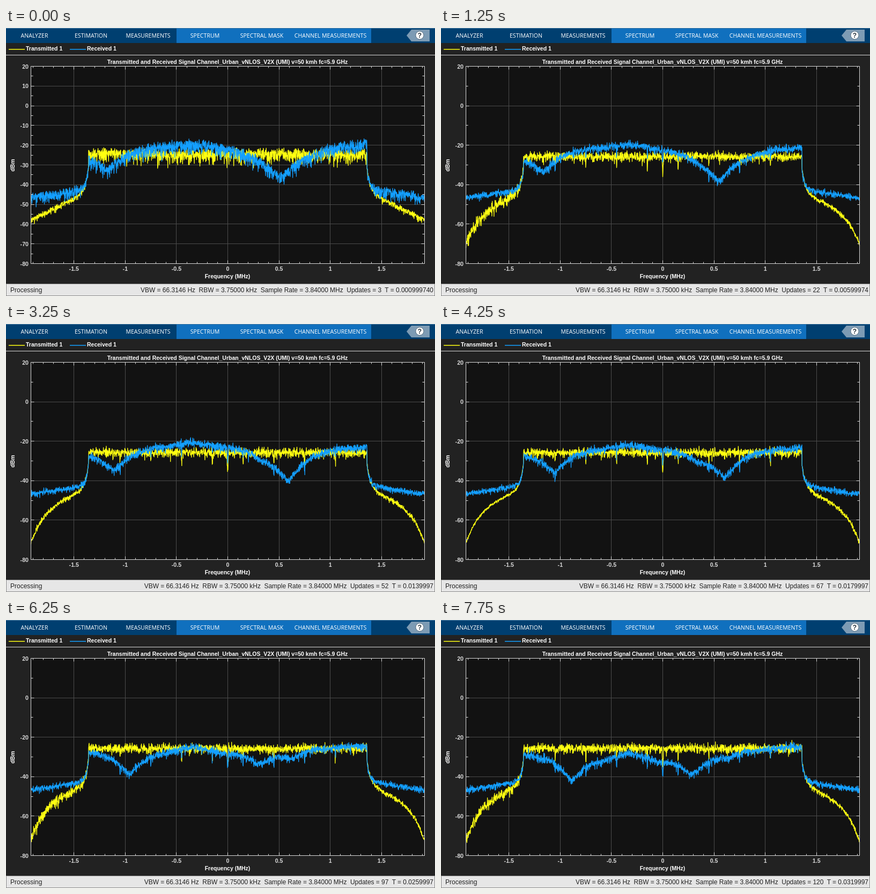
Write an HTML page that moves like this. It is 800 px wide and 500 px high and loops after 8000 ms.

```html
<!DOCTYPE html>
<html lang="en">
<head>
<meta charset="utf-8">
<title>Spectrum analyzer</title>
<style>
html, body { margin: 0; width: 100%; height: 100%; overflow: hidden; background: #222; }
svg { display: block; width: 800px; height: 500px; }
text { white-space: pre; }
.tab { font: 10.6px "Open Sans", "Noto Sans", sans-serif; fill: #fff; text-anchor: middle; }
.bold { font: bold 10.5px "Liberation Sans", Arial, sans-serif; fill: #fff; }
.tick { font-size: 10.67px; fill: #d9d9d9; }
.help { font-size: 12px; fill: #26323c; }
.status { font: 12px "Liberation Sans", Arial, sans-serif; fill: #222; word-spacing: -0.1px; }
.mid { text-anchor: middle; }
.end { text-anchor: end; }
.grid { stroke: #4b4b4b; fill: none; }
.axis { stroke: #d9d9d9; fill: none; }
.trace { fill: none; stroke-width: 1.3; stroke-linejoin: round; }
</style>
</head>
<body>
<svg id="stage" viewBox="0 0 800 500"></svg>
<script>
const STEP = 250, STEPS = 32, BINS = 2048;
const BOX = { x: 46.5, y: 71.5, w: 734, h: 368 };
const MID = BOX.x + BOX.w / 2;
const TX = '#ffff11', RX = '#139fff';
const stage = document.getElementById('stage');

function add(tag, attrs, text) {
  const el = document.createElementNS('http://www.w3.org/2000/svg', tag);
  for (const key in attrs) el.setAttribute(key, attrs[key]);
  if (text) el.textContent = text;
  stage.append(el);
  return el;
}
const rect = (x, y, width, height, fill) => add('rect', { x, y, width, height, fill });
const label = (x, y, cls, text) => add('text', { x, y, class: cls }, text);
const path = (cls, stroke) => add('path', stroke ? { class: cls, stroke } : { class: cls });
const xOf = mhz => MID + mhz / 1.92 * BOX.w / 2;
const yOf = dbm => BOX.y + (20 - dbm) / 100 * BOX.h;

// Toolstrip
rect(0, 0, 800, 500, '#222222');
rect(0, 0, 800, 28, '#003f70');
rect(318, 0, 363, 28, '#1070be');
rect(0, 0, 800, 1, '#4d7ea3');
[['ANALYZER', 53], ['ESTIMATION', 158.5], ['MEASUREMENTS', 265], ['SPECTRUM', 371],
 ['SPECTRAL MASK', 477], ['CHANNEL MEASUREMENTS', 605]].forEach(([t, x]) => label(x, 18, 'tab', t));
add('path', { d: 'M747 14L756 3H790V25H756Z', fill: '#7d9bb4' });
add('circle', { cx: 771.5, cy: 13.5, r: 7.5, fill: '#fff', stroke: '#5a6f80' });
label(771.5, 18, 'bold help mid', '?');

// Legend
rect(0, 50, 800, 1, '#d9d9d9');
rect(5, 39, 30, 1.5, TX);
rect(119, 39, 30, 1.5, RX);
label(37, 42, 'bold', 'Transmitted 1');
label(151, 42, 'bold', 'Received 1');

// Axes
rect(BOX.x, BOX.y, BOX.w, BOX.h, '#121212');
const grid = path('grid');
const tx = path('trace', TX), rx = path('trace', RX);
const axis = path('axis');
label(413, 67, 'bold mid', 'Transmitted and Received Signal Channel_Urban_vNLOS_V2X (UMI) v=50 kmh fc=5.9 GHz');
label(413, 467, 'bold mid', 'Frequency (MHz)');
add('text', { class: 'bold mid', transform: 'translate(16 256) rotate(-90)' }, 'dBm');
for (let f = -1.5; f <= 1.5; f += 0.5) label(xOf(f), 453, 'bold tick mid', String(f));
const yLabels = [];
for (let v = -80; v <= 20; v += 10) yLabels.push([v, label(42, yOf(v) + 4, 'bold tick end', String(v))]);

function drawAxes(major) {
  const { x, y, w, h } = BOX, r = x + w, b = y + h;
  const snap = n => Math.floor(n) + 0.5;
  let g = '', a = `M${x} ${y}h${w}v${h}h${-w}Z`;
  for (let i = -19; i <= 19; i++) {
    const px = snap(xOf(i / 10)), len = i % 5 ? 3 : 6;
    if (i % 5 === 0) g += `M${px} ${y}V${b}`;
    a += `M${px} ${y}v${len}M${px} ${b}v${-len}`;
  }
  for (let v = -80; v <= 20; v += major / 2) {
    const py = snap(yOf(v)), len = v % major ? 4 : 6;
    if (v % major === 0) g += `M${x} ${py}H${r}`;
    a += `M${x} ${py}h${len}M${r} ${py}h${-len}`;
  }
  grid.setAttribute('d', g);
  axis.setAttribute('d', a);
  yLabels.forEach(([v, el]) => el.setAttribute('visibility', v % major ? 'hidden' : 'visible'));
}

// Status bar
rect(0, 477, 800, 23, '#8c8c8c');
rect(1, 478, 798, 21, '#e6e6e6');
label(8, 493, 'status', 'Processing');
const status = label(797, 493, 'status end');

// Signal model in stage pixels; p runs from 0 to 1 over the loop
const EDGE = 259.5, SKIRT = BOX.w / 2 - EDGE;
const mix = (a, b, p) => a + (b - a) * p;
const clamp = p => Math.min(1, Math.max(0, p));
const smooth = p => clamp(p) ** 2 * (3 - 2 * clamp(p));
const easeIn = p => p * p, easeOut = p => 1 - (1 - p) ** 2;

// Passband gain: x, level at the start and at the end, easing between them
const GAIN = [
  [153, 238, 251, easeIn], [300, 222, 259, easeIn], [350, 216, 248, easeIn],
  [405, 221, 262, easeIn], [650, 216, 237, easeOut]
];
function gainAt(p) {
  const points = GAIN.map(([x, from, to, ease]) => [x, mix(from, to, ease(p))]);
  return x => {
    let i = 1;
    while (i < points.length - 1 && x > points[i][0]) i++;
    const [x0, y0] = points[i - 1], [x1, y1] = points[i];
    return mix(y0, y1, clamp((x - x0) / (x1 - x0)));
  };
}

// Fading notches drift along the band while they deepen or fill up
const notchesAt = p => [
  { x: 190 + 73 * Math.max(0, p - 0.26), depth: 34 + 10 * p, width: 30 },
  { x: 512 + 21 * easeOut(p), depth: mix(62, 7, smooth((p - 0.39) / 0.55)), width: 56 - 34 * p },
  { x: 490 - 22 * p, depth: 34 * p ** 1.6, width: 30 }
];
const notchDrop = (n, x) => n.depth * Math.exp(-((Math.abs(x - n.x) / n.width) ** 1.2));

// Nulls between carriers show up once the averaging has settled
function carrierDip(bin) {
  const d = Math.abs(bin - BINS / 2);
  if (d < 4) return 32 - 5 * d;
  return d < 700 && Math.abs(d % 160 - 80) < 2 ? 17 : 0;
}

// Skirts outside the band, by distance d from its edge
const rxSkirt = d => 297 + 20 * (d / SKIRT) ** 0.7 - 36 * Math.exp(-d / 4);
const txSkirt = (d, k, settled) =>
  305 + 54 * d / SKIRT - 45 * Math.exp(-d / 6) + settled * (44 + 0.35 * k) * (d / SKIRT) ** 5;

let seed = 2024;
function random() {
  seed = (seed + 0x6d2b79f5) | 0;
  let t = Math.imul(seed ^ (seed >>> 15), 1 | seed);
  t = (t + Math.imul(t ^ (t >>> 7), 61 | t)) ^ t;
  return ((t ^ (t >>> 14)) >>> 0) / 4294967296;
}
const gauss = () => (random() + random() + random() - 1.5) * 2;
const newNoise = () => Array.from({ length: BINS + 1 }, gauss);
const drift = noise => noise.map(n => 0.8 * n + 0.6 * gauss());

function trace(k, noise, isTx) {
  const p = k / (STEPS - 1), settled = 1 - Math.exp(-k / 1.4);
  const gain = gainAt(p), notches = notchesAt(p);
  const ripple = 3.6 + 2.2 * Math.cos((k - 5) * Math.PI * 2 / 23);
  let d = '';
  for (let i = 0; i <= BINS; i++) {
    const x = BOX.x + i / BINS * BOX.w, out = Math.abs(x - MID) - EDGE;
    let y, amp;
    if (out < 0) {
      y = isTx ? mix(237, 240, settled) : notches.reduce((sum, n) => sum + notchDrop(n, x), gain(x));
      y += carrierDip(i) * settled * (isTx ? 1 : 0.8);
      amp = isTx ? mix(7, 4.4, settled) : mix(6.5, 3.8, settled);
    } else if (isTx) {
      y = txSkirt(out, k, settled);
      amp = mix(3, x < MID ? ripple : 2.2, settled);
    } else {
      y = rxSkirt(out);
      amp = mix(5.5, 3, settled);
    }
    const skew = mix(0.12, 0.03, settled) * (noise[i] ** 2 - 1);
    d += (i ? 'L' : 'M') + x.toFixed(1) + ' ' + (y + amp * (noise[i] + skew)).toFixed(1);
  }
  return d;
}

function statusText(k) {
  const updates = Math.ceil(3 + 3.75 * k);
  const time = ((k + 1) * 1e-3 - 2.6e-7).toPrecision(6);
  return ['VBW = 66.3146 Hz', 'RBW = 3.75000 kHz', 'Sample Rate = 3.84000 MHz',
    'Updates = ' + updates, 'T = ' + time].join('  ');
}

const steps = [];
let txNoise = newNoise(), rxNoise = newNoise();
for (let k = 0; k < STEPS; k++) {
  steps.push({ tx: trace(k, txNoise, true), rx: trace(k, rxNoise, false), text: statusText(k) });
  txNoise = drift(txNoise);
  rxNoise = drift(rxNoise);
}

let shown = -1;
function show(k) {
  if (k === shown) return;
  shown = k;
  tx.setAttribute('d', steps[k].tx);
  rx.setAttribute('d', steps[k].rx);
  status.textContent = steps[k].text;
  drawAxes(k ? 20 : 10);
}

const start = performance.now();
function tick() {
  show(Math.floor((performance.now() - start) / STEP) % STEPS);
  requestAnimationFrame(tick);
}
tick();
</script>
</body>
</html>
```
